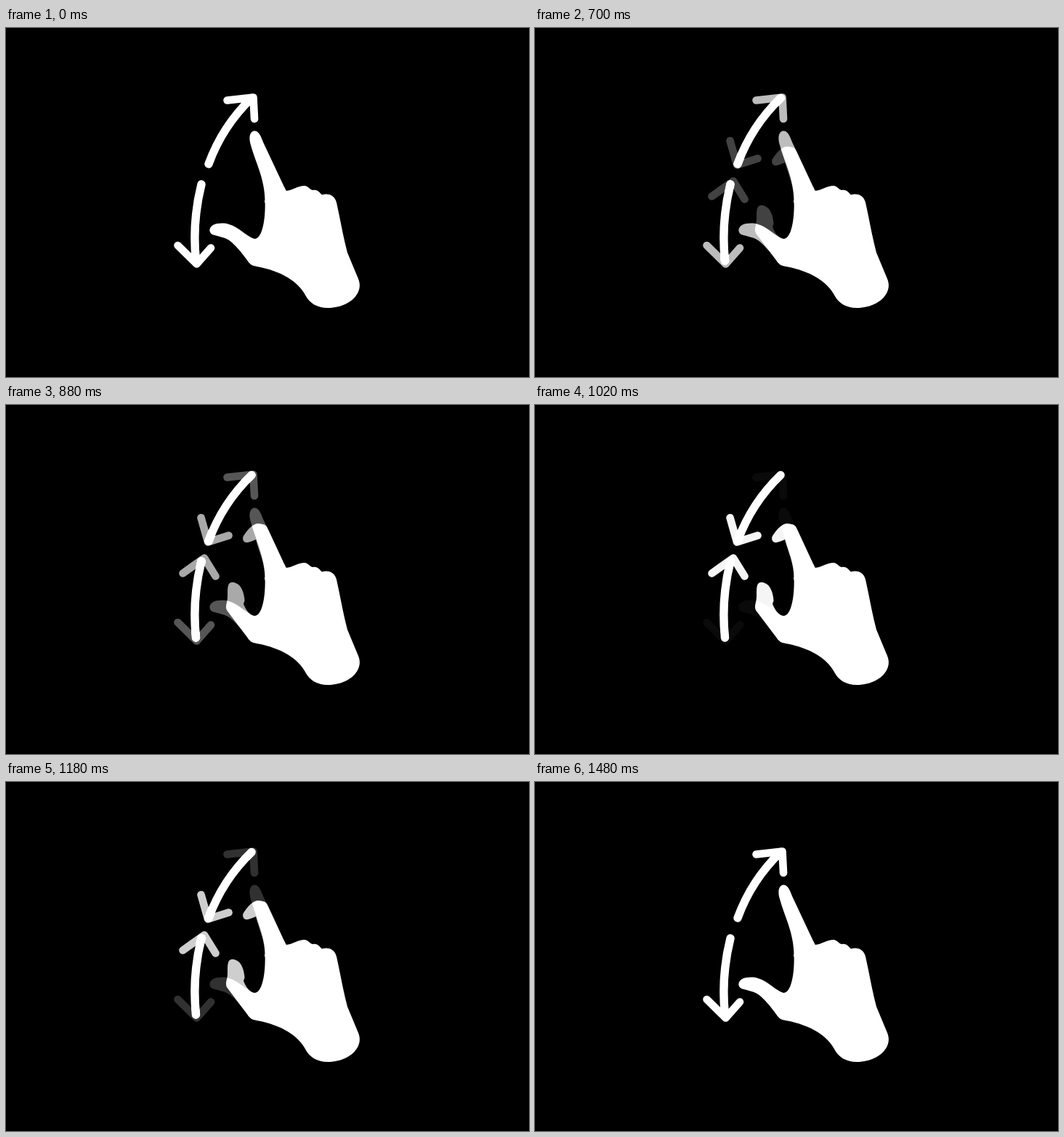
An HTML page that plays this animation: 720x480 px, repeating every 1.9 s.

```html
<!DOCTYPE html>
<html lang="en">
<head>
<meta charset="utf-8">
<title>Pinch gesture</title>
<style>
  @property --spread { syntax: "<number>"; inherits: true; initial-value: 1; }

  html, body { margin: 0; width: 100%; height: 100%; overflow: hidden; background: #000; }

  svg {
    display: block;
    width: 720px;
    height: 480px;
    isolation: isolate;
    fill: #fff;
    animation: pinch 1900ms linear infinite;
  }

  .arrow { fill: none; stroke: #fff; stroke-width: 10.6; stroke-linecap: round; stroke-linejoin: round; }
  .shaft { stroke-width: 11.4; }

  /* The poses add up to solid white wherever they overlap. */
  .open, .closed { mix-blend-mode: plus-lighter; }
  .open { opacity: var(--spread); }
  .closed { opacity: calc(1 - var(--spread)); }

  @keyframes pinch {
    0%, 31.05% { --spread: 1; }
    42.105% { --spread: .51; }
    53.684% { --spread: .04; }
    56%, 58.947% { --spread: 0; }
    62.105% { --spread: .19; }
    69.474% { --spread: .49; }
    77.895%, 100% { --spread: 1; }
  }
</style>
</head>
<body>
<svg viewBox="0 0 720 480">
  <path d="M382.500 218 L385.500 224 C394 223.500 402 217 411 217 C416 217.500 418 222 422 223
    C428 221.500 431 225 435 229.500 C441 227.500 452 228 455 240 C460 262 464 287 470 309
    L485 345 C487 350 487.500 355 486 360 C481 376 462 385 443 385 C428 385 418 378 413 369
    C403 349 379 334 345 328 C340 327 337 326 334 322 L330 312 L342 290
    C354 290 357.500 258 356.500 237 Z"/>
  <g class="arrow shaft">
    <path d="M279 187 Q298 135 338 96.500"/>
    <path d="M269 215 Q256 267 261.500 320"/>
  </g>

  <g class="open">
    <path d="M386 225 L354 157 C351 149 348 141.500 342 141.500 C335 142 334 152 337 161
      C343 184 357 208 356.500 240 L370 260 Z"/>
    <path d="M334 322 C326 311 319 302 311 295 C302 287 292 287 284 284 C279 281 279 275 285 271
      C291 268 301 268 307 270 C321 274 330 286 342 290 L355 300 L345 326 Z"/>
    <g class="arrow">
      <path d="M304.500 99.500 L340.500 95.500 L342 125"/>
      <path d="M236.500 299 L262.500 324.500 L282 302.500"/>
    </g>
  </g>

  <g class="closed">
    <path d="M386 225 L361 171 C358 164 356 164 346 163 C337 165 330 175 326.500 181
      C325 186 328 190 333 189 C338 188 341 186 344 185 C349 203 357 219 356.500 240 L370 260 Z"/>
    <path d="M334 322 L304.500 283 C302 279 303 275 304 271 C306 264 304 255 306 248
      C308 242 315 243 320 247 C326 252 328 262 328.500 269 C328 272 326 273 328 276
      C331 283 336 289 342 290 L355 300 L345 326 Z"/>
    <g class="arrow">
      <path d="M268.500 155 L278 188.500 L306.500 179.500"/>
      <path d="M243.500 231.500 L273 210.500 L288.500 235.500"/>
    </g>
  </g>
</svg>
</body>
</html>
```
